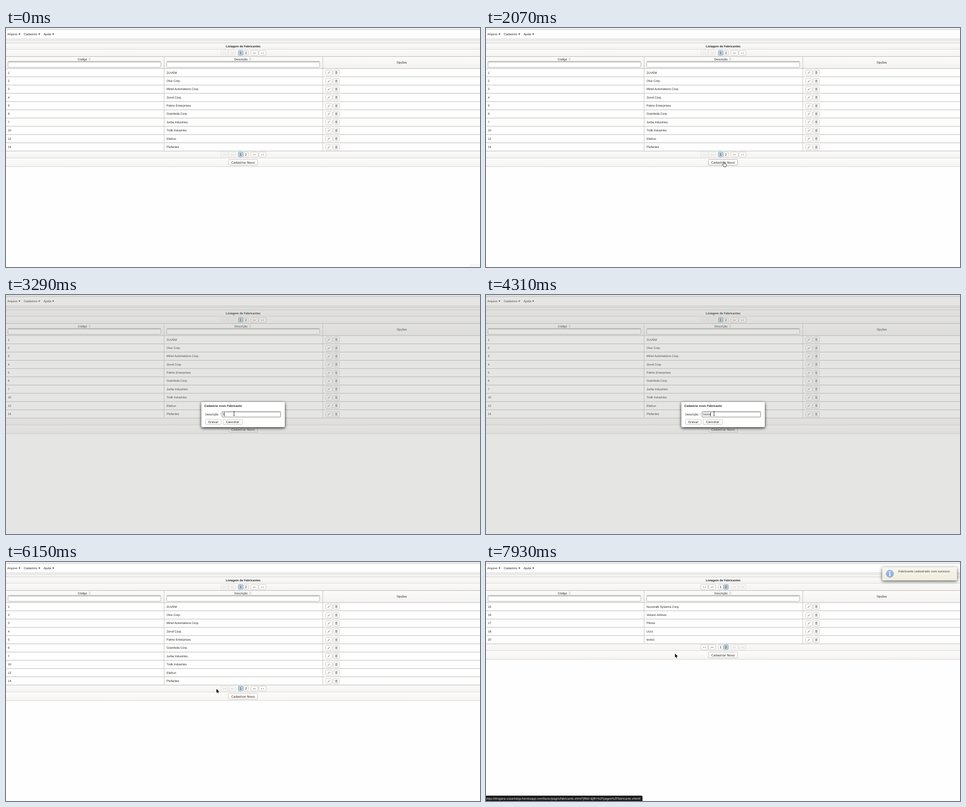
An HTML page with a canvas that plays this animation: 1054x532 px, repeating every 8000 ms.

```html
<!DOCTYPE html>
<html lang="pt-BR">
<head>
<meta charset="utf-8">
<title>Listagem de Fabricantes</title>
<style>
html, body { margin: 0; width: 100%; height: 100%; overflow: hidden; background: #fefefe; }
canvas { display: block; width: 1054px; height: 532px; }
</style>
</head>
<body>
<canvas id="stage" width="1054" height="532"></canvas>
<script>
const c = document.getElementById('stage').getContext('2d');
const W = 1054, H = 532, LOOP = 8000, STEP = 70;
const SANS = '6.6px "Liberation Sans", Arial, sans-serif';
const BOLD = 'bold ' + SANS;
const WIDE = '6.7px "DejaVu Sans", Verdana, sans-serif';
const LINE = '#b5b3b0';

const pages = [
  [[1, 'ZUVEM'], [2, 'Olve Corp.'], [3, 'Mirtel Automations Corp.'], [4, 'Zervil Corp.'],
   [5, 'Palmo Enterprises'], [6, 'Grambola Corp.'], [7, 'Jurba Industries.'],
   [10, 'Trelk Industries'], [12, 'Ebdrun'], [14, 'Plufardes']],
  [[15, 'Nuvotralk Systems Corp.'], [16, 'Velunic Airlines'], [17, 'Plonur'], [18, 'UUU'], [20, 'teste1']]
];
const url = 'https://drogaria-usuarioloja.herokuapp.com/faces/pages/fabricante.xhtml?jftfdi=&jffi=%2Fpages%2Ffabricante.xhtml#';

// time, x, y, ease-out power until the next point (0 = smooth)
const path = [
  [120, 1016, 526, 1], [890, 745, 374, 1.4], [1520, 528, 298, 0], [2330, 528, 298, 0],
  [3090, 507, 264, 0], [4310, 507, 264, 1], [4520, 507, 271, 1], [4800, 500, 281, 1.4],
  [5350, 468, 282.5, 0], [6220, 468, 282.5, 0], [6700, 540, 285, 0], [6770, 540, 285, 0],
  [7180, 533, 281, 0], [7450, 533, 281, 0], [7930, 420.3, 204, 0]
];
// time, typed text
const typing = [[2200, ''], [3290, 't'], [3490, 'te'], [3760, 'tes'], [3900, 'test'], [4110, 'teste'], [4380, 'teste1']];

const lastBefore = (list, t) => list.filter(k => k[0] <= t).pop();

function pointer(t) {
  const a = lastBefore(path, t);
  if (!a) return null;
  const b = path[path.indexOf(a) + 1];
  if (!b) return { x: a[1], y: a[2] };
  const u = Math.floor((t - a[0]) / STEP) * STEP / (b[0] - a[0]);
  const e = a[3] ? 1 - Math.pow(1 - u, a[3]) : u * u * (3 - 2 * u);
  return { x: a[1] + (b[1] - a[1]) * e, y: a[2] + (b[2] - a[2]) * e };
}

const inside = (p, x, y, w, h) => !!p && p.x >= x && p.x < x + w && p.y >= y && p.y < y + h;

function rect(x, y, w, h, fill) {
  c.fillStyle = fill;
  c.fillRect(x, y, w, h);
}

function shade(y0, y1, top, bottom) {
  const g = c.createLinearGradient(0, y0, 0, y1);
  g.addColorStop(0, top);
  g.addColorStop(1, bottom);
  return g;
}

function text(s, x, y, font = SANS, color = '#222', align = 'left') {
  c.font = font;
  c.fillStyle = color;
  c.textAlign = align;
  c.fillText(s, x, y + 2.4);
}

function box(x, y, w, h, r, fill, stroke) {
  c.beginPath();
  c.roundRect(x + .5, y + .5, w - 1, h - 1, r);
  c.fillStyle = fill;
  c.fill();
  if (stroke) {
    c.strokeStyle = stroke;
    c.lineWidth = 1;
    c.stroke();
  }
}

// floating panel with a soft shadow below it
function panel(x, y, w, h, r, fill, blur, dark) {
  c.save();
  c.shadowColor = `rgba(0,0,0,${dark})`;
  c.shadowBlur = blur;
  c.shadowOffsetY = 2;
  c.beginPath();
  c.roundRect(x, y, w, h, r);
  c.fillStyle = fill;
  c.fill();
  c.restore();
}

function poly(points, fill) {
  c.beginPath();
  points.forEach(([x, y]) => c.lineTo(x, y));
  c.closePath();
  c.fillStyle = fill;
  c.fill();
}

function button(label, x, y, w, h, hover, down) {
  const fill = down ? '#e9e7e3' : shade(y, y + h, '#ffffff', hover ? '#f8f7f5' : '#f6f5f2');
  box(x, y, w, h, 2, fill, hover ? '#b0ada8' : '#c9c6c1');
  text(label, x + w / 2, y + h / 2 + .2, WIDE, '#222', 'center');
}

function input(x, y, w, h, focus) {
  if (focus) box(x - 1, y - 1, w + 2, h + 2, 3, '#c9c9c6');
  box(x, y, w, h, 2, '#fff', focus ? '#8d8d8a' : '#b3b3b0');
  rect(x + 1, y + 1, w - 2, 3, shade(y + 1, y + 4, '#c4c4c2', '#ffffff'));
  rect(x + 1, y, w - 2, 1, '#9a9a98');
}

function triangle(x, y, dir, color) {
  poly([[x - dir * 1.2, y - 1.3], [x - dir * 1.2, y + 1.3], [x + dir * 1.2, y]], color);
}

function pagerArrow(x, w, y, dir, edge, off) {
  c.globalAlpha = off ? .4 : 1;
  box(x, y - 6, w, 12, 2, off ? '#f1f0ee' : '#fbfaf9', '#cfccc8');
  const m = x + w / 2, col = off ? '#999' : '#777';
  triangle(m - dir * 1.5, y + .5, dir, col);
  if (edge) rect(m + dir * 2 - .5, y - .8, 1, 2.6, col);
  else triangle(m + dir * 1.6, y + .5, dir, col);
  c.globalAlpha = 1;
}

function pager(y, page, hover) {
  pagerArrow(477, 17, y, -1, true, page === 0);
  pagerArrow(494, 17, y, -1, false, page === 0);
  pagerArrow(544, 17, y, 1, false, page === 1);
  pagerArrow(562, 17, y, 1, true, page === 1);
  [516, 528].forEach((x, i) => {
    const on = i === page;
    const fill = on ? (i ? '#bccbd5' : '#b4d3e4') : '#fbfaf9';
    box(x, y - 6, 11.5, 12, 2, fill, on ? '#9aafbb' : hover && i ? '#a5a29d' : '#cfccc8');
    text(i + 1, x + 5.6, y, WIDE, '#222', 'center');
  });
}

function sortIcon(x, y) {
  c.strokeStyle = '#777';
  c.lineWidth = .7;
  c.beginPath();
  c.moveTo(x - 1.8, y - .8);
  c.lineTo(x, y - 2.6);
  c.lineTo(x + 1.8, y - .8);
  c.moveTo(x - 1.8, y + .8);
  c.lineTo(x, y + 2.6);
  c.lineTo(x + 1.8, y + .8);
  c.stroke();
}

function rowButtons(y) {
  box(710, y - 6, 16, 13, 2, '#fafaf8', '#cfccc8');
  box(727, y - 6, 15, 13, 2, '#fafaf8', '#cfccc8');
  c.strokeStyle = '#8a8a88';
  c.lineWidth = 1.2;
  c.beginPath();
  c.moveTo(716, y + 2.3);
  c.lineTo(720, y - 1.7);
  c.stroke();
  rect(715, y + 2.2, 1, 1, '#999');
  rect(732, y - 2, 5, 1, '#888');
  rect(733.5, y - 2.8, 2, 1, '#888');
  rect(732.5, y - .6, 4, 4, '#969694');
  rect(734, y, .8, 3, '#ddd');
}

function menu() {
  rect(0, 0, W, 1, '#d8d8d6');
  rect(0, 3, W, 1, '#b9b9b7');
  [['Arquivo', 3, 30], ['Cadastros', 39.5, 74], ['Ajuda', 83.5, 105]].forEach(([s, x, a]) => {
    text(s, x, 13.6);
    poly([[a - 2.2, 12.6], [a + 2.2, 12.6], [a, 15.2]], '#222');
  });
  [24, 27, 31].forEach(y => rect(0, y, W, 1, '#c3c2bf'));
}

function list(page, p, t, modal) {
  const rows = pages[page];
  rect(0, 34, W, 13, shade(34, 47, '#fcfcfb', '#f3f2f0'));
  rect(0, 34, W, 1, '#d3d2cf');
  text('Listagem de Fabricantes', 527.3, 40.8, BOLD, '#222', 'center');
  rect(0, 47, W, 16, shade(47, 63, '#fafaf9', '#f4f3f1'));
  rect(0, 47, W, 1, '#dbdad7');
  pager(55.5, page, false);

  rect(0, 63, W, 27, shade(63, 90, '#fbfbfa', '#f3f2f0'));
  rect(0, 63, W, 1, LINE);
  text('Código', 170, 69.5, SANS, '#222', 'center');
  sortIcon(186, 69.3);
  text('Descrição', 522.5, 69.5, SANS, '#222', 'center');
  sortIcon(543, 69.3);
  text('Opções', 880, 77, SANS, '#222', 'center');
  input(4, 74, 341, 14);
  input(357, 74, 341, 14);

  const edge = i => 89.8 + 18.36 * i;
  rows.forEach(([id, name], i) => {
    rect(0, edge(i), W, 1, LINE);
    const y = 99.2 + 18.37 * i;
    text(id, 4.3, y);
    text(name, 357, y);
    rowButtons(Math.round(y));
  });
  const end = edge(rows.length), foot = Math.floor(end);
  rect(351, 63, 1, end - 63, '#c3c1be');
  rect(704, 63, 1, end - 63, '#c3c1be');

  rect(0, end, W, 17, shade(end, end + 17, '#fafaf9', '#f4f3f1'));
  rect(0, end, W, 1, LINE);
  rect(0, foot + 17, W, 18, shade(foot + 17, foot + 35, '#fcfcfb', '#f5f4f2'));
  rect(0, foot + 16, W, 1, '#d6d5d2');
  rect(0, foot + 35, W, 1, '#d3d2cf');
  pager(foot + 8.5, page, !modal && inside(p, 528, foot + 2, 12, 13));
  const over = !modal && inside(p, 494, foot + 19, 66, 14);
  button('Cadastrar Novo', 494, foot + 19, 66, 14, over, over && t >= 2000 && t < 2070);
}

function dialog(t, p) {
  rect(0, 1, W, H, 'rgba(170,169,167,.3)');
  panel(434.3, 238, 185.7, 56.3, 3, '#fff', 6, .9);
  text('Cadastrar novo Fabricante', 441, 246.3, BOLD);
  text('Descrição', 443, 265.8);
  text('*', 475, 265.8, SANS, '#777');

  const focus = t < 5680;
  input(480, 259, 131, 13, focus);
  const [since, word] = lastBefore(typing, t);
  text(word, 482.6, 265.6, WIDE);
  if (focus && (t - since) % 1060 < 530) {
    rect(Math.round(482.4 + c.measureText(word).width), 261, 1, 9, '#333');
  }
  const save = inside(p, 443, 276, 36, 13);
  button('Gravar', 443, 276, 36, 13, save, save && t >= 5680 && t < 5820);
  button('Cancelar', 482, 276, 44, 13, inside(p, 482, 276, 44, 13));
}

function growl(alpha) {
  c.save();
  c.globalAlpha = alpha;
  panel(881, 11.5, 166.3, 29.5, 2, shade(12, 41, '#f8f7ee', '#f0ecdc'), 7, .65);
  c.beginPath();
  c.arc(898, 26, 8.3, 0, 7);
  c.fillStyle = shade(17, 35, '#a9c3ee', '#7fa3e0');
  c.fill();
  c.strokeStyle = '#8eabdd';
  c.lineWidth = .8;
  c.stroke();
  rect(896.8, 20.5, 2.4, 2.4, '#fff');
  rect(896.8, 24.3, 2.4, 7, '#fff');
  rect(895.8, 24.3, 2, 1, '#fff');
  rect(895.6, 30.4, 4.8, 1, '#fff');
  text('Fabricante cadastrado com sucesso.', 917, 21, BOLD, '#68665f');
  c.restore();
}

const arrowShape = new Path2D('M0 0V8.6L2 6.8 3.4 9.8 4.8 9.2 3.4 6.3H6.2Z');
const handShape = new Path2D('M0 5V.3Q1-1.2 2 .3V3.8L5.6 4.5Q6.8 4.8 6.6 6.8L6 9 5.5 11H1L.4 9-2.3 6.3Q-2 4.6-.5 5.8Z');
const beamShape = new Path2D('M-2-4.5H-.5L0-4 .5-4.5H2M0-4V4M-2 4.5H-.5L0 4 .5 4.5H2');

function drawPointer(p, kind) {
  c.save();
  c.translate(p.x, p.y);
  c.lineJoin = 'round';
  if (kind === 'beam') {
    c.strokeStyle = '#222';
    c.lineWidth = .9;
    c.stroke(beamShape);
  } else if (kind === 'hand') {
    c.fillStyle = '#fff';
    c.fill(handShape);
    c.strokeStyle = '#111';
    c.lineWidth = .9;
    c.stroke(handShape);
  } else {
    c.strokeStyle = '#fff';
    c.lineWidth = 1;
    c.stroke(arrowShape);
    c.fillStyle = '#000';
    c.fill(arrowShape);
  }
  c.restore();
}

function pointerKind(p, modal, page) {
  if (modal) {
    if (inside(p, 480, 259, 131, 13)) return 'beam';
    return inside(p, 443, 276, 36, 13) || inside(p, 482, 276, 44, 13) ? 'hand' : 'arrow';
  }
  if (page) return 'arrow';
  return inside(p, 494, 292, 66, 14) || inside(p, 528, 275, 12, 13) ? 'hand' : 'arrow';
}

function draw(t) {
  const p = pointer(t), modal = t >= 2200 && t < 6150, page = t >= 7450 ? 1 : 0;
  rect(0, 0, W, H, '#fefefe');
  menu();
  list(page, p, t, modal);
  if (t < 2000) box(1031, 527, 30, 12, 2, '#fbfbfb', '#e2e2e2');
  if (modal) dialog(t, p);
  if (t >= 6290) growl(Math.min(1, (Math.floor((t - 6290) / STEP) + 1) / 6.5));
  if (t >= 6840) {
    box(-4, 520, 352, 16, 2, '#1b1b1d', '#2a2a2c');
    text(url, -1, 526.4, '6.68px "Liberation Sans", Arial, sans-serif', '#f0f0f0');
  }
  if (p) drawPointer(p, pointerKind(p, modal, page));
}

c.textRendering = 'geometricPrecision';
const start = performance.now();
function tick(now) {
  draw(Math.max(0, now - start) % LOOP);
  requestAnimationFrame(tick);
}
draw(0);
requestAnimationFrame(tick);
</script>
</body>
</html>
```
